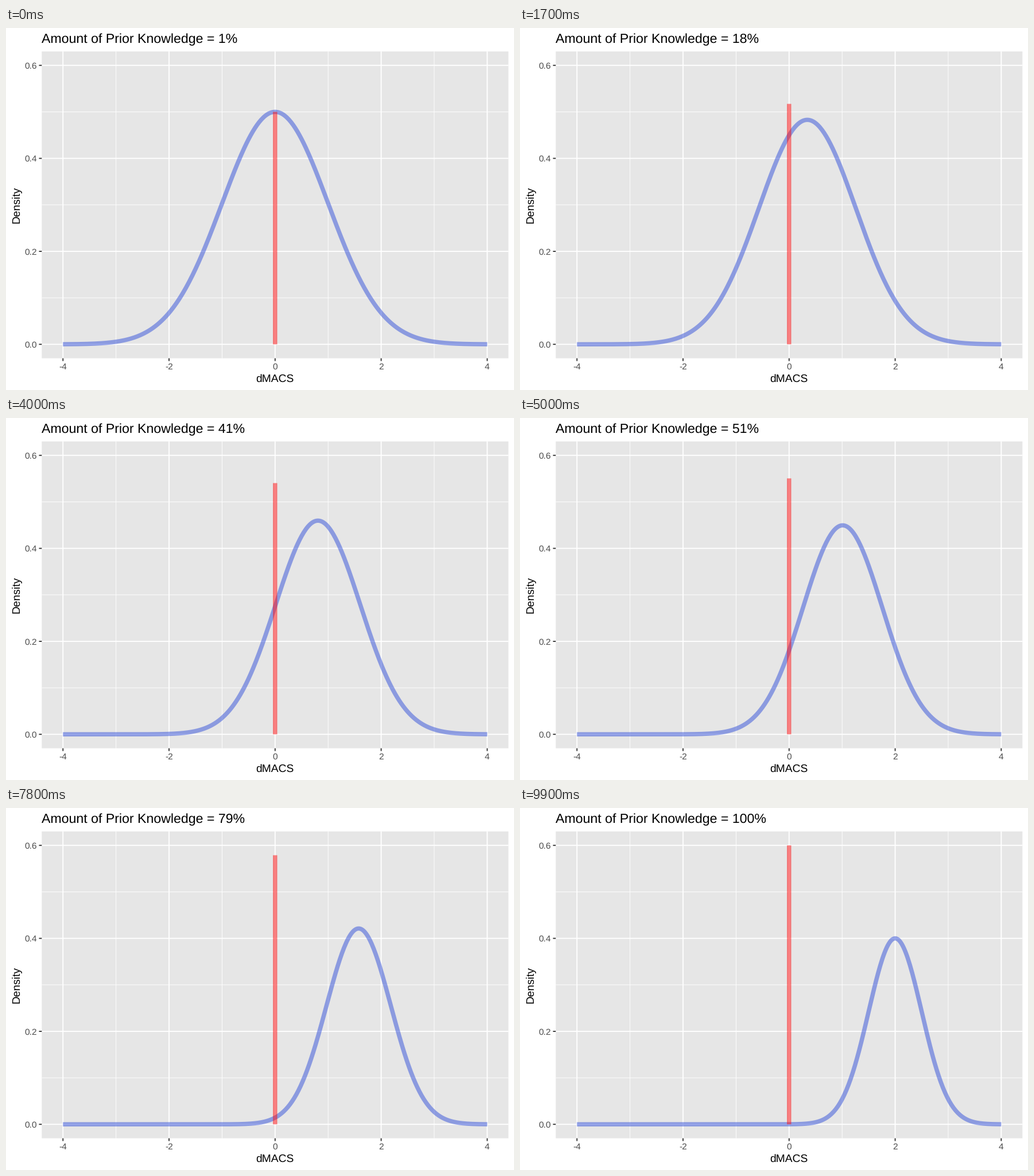
These frames come from a looping animation (885 by 632 pixels, 10 s). A matplotlib script:

```python
import numpy as np
import matplotlib.pyplot as plt
from matplotlib.animation import FuncAnimation
from matplotlib.patches import Rectangle

W, H, DPI = 885, 632, 64
FRAMES, INTERVAL = 100, 100

# Panel edges in pixels, y pointing down
LEFT, RIGHT, TOP, BOTTOM = 62.3, 875.3, 40.9, 576.6
XLIM, YLIM = (-4.4, 4.4), (-0.03, 0.63)

PT = W / 504           # pixels per layout point
MAJOR, MINOR, BOLD = 1.87, 0.94, 7.49
BLUE, RED = "#3250da", "#ff0a0c"

plt.rcParams["font.family"] = "Liberation Sans"
plt.rcParams["text.hinting"] = "none"

fig = plt.figure(figsize=(W / DPI, H / DPI), dpi=DPI, facecolor="white")
ax = fig.add_axes([0, 0, 1, 1])
ax.set_xlim(0, W)
ax.set_ylim(H, 0)
ax.axis("off")


def px(x):
    return LEFT + (x - XLIM[0]) / (XLIM[1] - XLIM[0]) * (RIGHT - LEFT)


def py(y):
    return BOTTOM - (y - YLIM[0]) / (YLIM[1] - YLIM[0]) * (BOTTOM - TOP)


def line(xs, ys, width, color, **kw):
    """Line in pixel coordinates with a width in pixels."""
    return ax.plot(xs, ys, lw=width * 72 / DPI, color=color, snap=False,
                   solid_capstyle="butt", solid_joinstyle="round", **kw)[0]


def label(x, y, text, points, color="black", **kw):
    kw = {"ha": "center", "va": "baseline", **kw}
    return ax.text(x, y, text, fontsize=points * PT * 72 / DPI,
                   color=color, **kw)


def grid(xs, ys, width):
    for y in ys:
        line([LEFT, RIGHT], [py(y)] * 2, width, "white")
    for x in xs:
        line([px(x)] * 2, [TOP, BOTTOM], width, "white")


x_ticks = (-4, -2, 0, 2, 4)
y_ticks = (0, 0.2, 0.4, 0.6)

ax.add_patch(Rectangle((LEFT, TOP), RIGHT - LEFT, BOTTOM - TOP,
                       fc="#e6e6e6", lw=0, snap=False))
grid((-3, -1, 1, 3), (0.1, 0.3, 0.5), MINOR)
grid(x_ticks, y_ticks, MAJOR)

tick = 2.75 * PT
for x in x_ticks:
    line([px(x)] * 2, [BOTTOM, BOTTOM + tick], MAJOR, "#333333")
    label(px(x), 596.3, str(x), 8.8, "#4d4d4d")
for y in y_ticks:
    line([LEFT - tick, LEFT], [py(y)] * 2, MAJOR, "#333333")
    label(53.6, py(y) + 5.5, f"{y:.1f}", 8.8, "#4d4d4d", ha="right")

label(px(0), 618.3, "dMACS", 11)
label(23.5, (TOP + BOTTOM) / 2, "Density", 11,
      rotation=90, rotation_mode="anchor")
title = label(LEFT, 26.3, "", 13.2, ha="left")

grid_x = np.linspace(-4, 4, 401)
curve = line(px(grid_x), px(grid_x), BOLD, BLUE, alpha=0.5)
bar = line([px(0)] * 2, [py(0)] * 2, BOLD, RED, alpha=0.5)


def update(i):
    t = i / (FRAMES - 1)
    mean, sd, peak = 2 * t, 1 - 0.5 * t, 0.5 - 0.1 * t
    curve.set_ydata(py(peak * np.exp(-0.5 * ((grid_x - mean) / sd) ** 2)))
    bar.set_ydata([py(0), py(0.5 + 0.1 * t)])
    title.set_text(f"Amount of Prior Knowledge = {i + 1}%")
    return curve, bar, title


anim = FuncAnimation(fig, update, frames=FRAMES, interval=INTERVAL,
                     repeat=True, repeat_delay=0)
plt.show()
```
